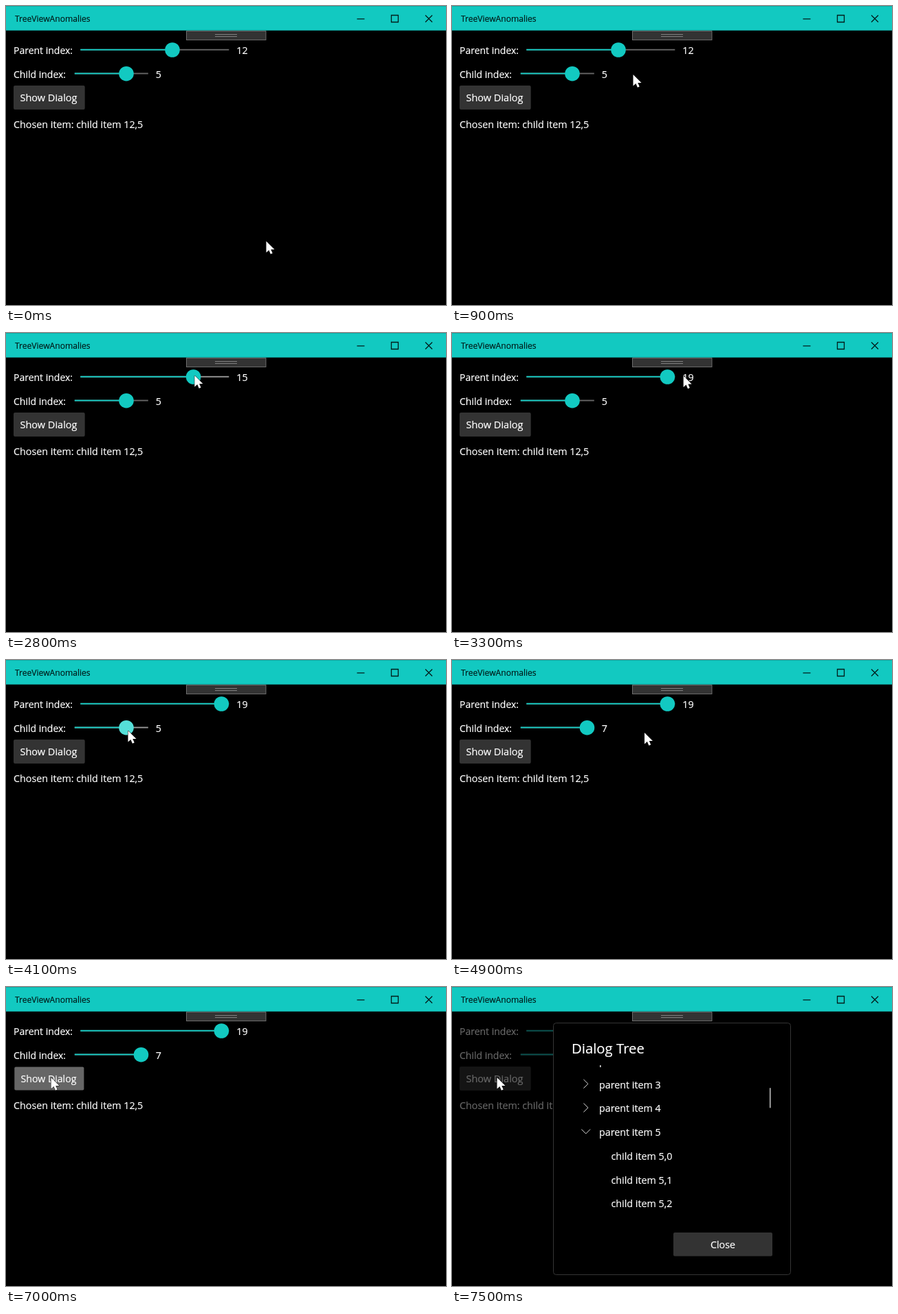
An HTML page that plays this animation: 640x436 px, repeating every 8000 ms.

```html
<!DOCTYPE html>
<html lang="en">
<head>
<meta charset="utf-8">
<title>TreeViewAnomalies</title>
<style>
  html, body { margin: 0; width: 100%; height: 100%; overflow: hidden; background: #000; }
  svg { display: block; width: 640px; height: 436px; color: #fff; }
  text {
    font: 14.3px "Open Sans", "Noto Sans", sans-serif; white-space: pre;
    fill: currentColor; stroke: currentColor; stroke-width: .2px;
  }
  .line { fill: none; stroke: currentColor; }
  .teal { fill: #12c9c1; }
  .caption { color: #021d1b; }
  .caption text { font-size: 12.1px; }
</style>
</head>
<body>
<svg viewBox="0 0 640 436">
  <clipPath id="listArea"><rect x="160" y="114" width="320" height="220"/></clipPath>
  <rect width="640" height="436"/>

  <g id="sliders"></g>
  <g id="button">
    <rect x="11" y="116" width="103.7" height="35" rx="2"/>
    <text x="20.5" y="139" style="font-size:14.5px">Show Dialog</text>
  </g>
  <text x="11" y="178">Chosen item: child item 12,5</text>
  <rect id="smoke" y="36" width="640" height="400"/>

  <g id="dialog">
    <rect x="147.5" y="52.5" width="345" height="367" rx="4" stroke="#353535"/>
    <text x="174" y="96.7" style="font-size:20.3px">Dialog Tree</text>
    <g id="list" clip-path="url(#listArea)"></g>
    <rect x="461.8" y="147" width="2" height="29.5" rx="1" fill="#9c9c9c"/>
    <rect x="322" y="358" width="144" height="34.5" rx="2" fill="#333"/>
    <text x="394" y="381" text-anchor="middle">Close</text>
  </g>

  <g class="caption">
    <rect class="teal" width="640" height="35.7"/>
    <rect width="640" height="1" fill="#0fa9a3"/>
    <text x="13" y="22.7">TreeViewAnomalies</text>
    <path class="line" stroke-width="1.3" d="M510.5 18.8h11M560.5 13.5h10v10h-10zM610 13.5l10 10m0 -10l-10 10"/>
  </g>
  <rect x="262.5" y="36.5" width="115.5" height="13" fill="#333" stroke="#6c6c6c"/>
  <path class="line" d="M304 41.5h32m0 3h-32" style="stroke:#808080"/>

  <path id="cursor" d="M.5 0V16.6L4.4 13L6.9 18.8L9.7 17.6L7.3 12H12.5Z" fill="#fff" stroke="#000" paint-order="stroke"/>
</svg>
<script>
const LOOP = 8000, STEP = 100;
const $ = selector => document.querySelector(selector);

const home = { x: 378, y: 343 };
const moves = [
  { from: 0, to: 200, x: 342, y: 239 },
  { from: 300, to: 900, x: 263, y: 100 },
  { from: 1500, to: 2200, x: 244, y: 62 },
  { from: 2600, to: 3100, x: 338, y: 62 },
  { from: 3200, to: 4100, x: 177, y: 103 },
  { from: 4100, to: 4800, x: 283, y: 115 },
  { from: 4800, to: 5000, x: 276, y: 97 },
  { from: 5000, to: 5300, x: 168, y: 225 },
  { from: 5300, to: 5600, x: 74, y: 147 },
  { from: 5600, to: 5900, x: 65, y: 132 }
];

const sliders = [
  { label: 'Parent index:', left: 108.3, y: 64, width: 216, first: 12, last: 19,
    thumb: 242, gap: 10.2, dragFrom: 2700, dragTo: 3200 },
  { label: 'Child index:', left: 99.8, y: 98.7, width: 107, first: 5, last: 7,
    thumb: 175, gap: 10.75, dragFrom: 4200, dragTo: 4600 }
];

const clamp = (v, lo, hi) => Math.min(hi, Math.max(lo, v));
const ramp = (t, from, to) => clamp((t - from) / (to - from), 0, 1);
const easeOut = p => 1 - (1 - p) ** 2;
const easeInOut = p => p ** 3 * (p * (6 * p - 15) + 10);
const inside = (p, x, y, w, h) => p.x >= x && p.x < x + w && p.y >= y && p.y < y + h;

function pointerAt(t) {
  return moves.reduce((p, m) => {
    const k = easeInOut(ramp(t, m.from, m.to));
    return { x: p.x + (m.x - p.x) * k, y: p.y + (m.y - p.y) * k };
  }, home);
}

function buildSliders() {
  $('#sliders').innerHTML = sliders.map(({ label, left, y, width }) => `<g>
    <text x="11" y="${y + 6.2}" style="font-size:14px">${label}</text>
    <rect class="track" x="${left}" y="${y - 1.2}" width="${width}" height="1.9"/>
    <rect class="fill teal" x="${left}" y="${y - 1.2}" height="1.9"/>
    <circle class="thumb" cy="${y}" r="10.8"/>
    <text class="value" x="${left + width + 11}" y="${y + 6.2}"/>
  </g>`).join('');
  sliders.forEach((s, i) => s.node = $('#sliders').children[i]);
}

function buildList() {
  const row = (i, x, label) => `<text x="${x}" y="${112.9 + i * 34.75}">${label}</text>`;
  const chevron = i => {
    const angle = i === 3 ? 90 : 0;
    return `<path class="line" d="M-3.3 -6.4L3.2 0L-3.3 6.4" style="stroke:#ddd"
      transform="translate(194.7 ${106.5 + i * 34.75}) rotate(${angle})"/>`;
  };
  let rows = '';
  for (let i = 0; i < 4; i++) rows += row(i, 214, `parent item ${i + 2}`) + chevron(i);
  for (let i = 0; i < 3; i++) rows += row(i + 4, 231.5, `child item 5,${i}`);
  $('#list').innerHTML = rows;
}

function drawSlider(s, t, pointer) {
  const dragging = t >= s.dragFrom && t < s.dragTo;
  const hover = inside(pointer, s.left, s.y - 16, s.width, 34);
  let value = t < s.dragFrom ? s.first : s.last;
  if (dragging) value = clamp(Math.round(s.first + (pointer.x - s.thumb) / s.gap), s.first, s.last);
  const x = s.thumb + (value - s.first) * s.gap;
  const part = name => s.node.querySelector('.' + name);
  part('track').setAttribute('fill', hover || dragging ? '#999' : '#666');
  part('fill').setAttribute('width', x - s.left);
  part('thumb').setAttribute('cx', x);
  part('thumb').setAttribute('fill', hover && !dragging ? '#55dfd8' : '#12c9c1');
  part('value').textContent = value;
}

function drawButton(t, pointer) {
  const open = t >= 7100;
  const press = open ? 0 : ramp(t, 6100, 6500);
  const hover = !open && inside(pointer, 11, 116, 104, 35);
  const gray = hover ? 26 + 76 * press : 51;
  $('#button rect').setAttribute('fill', `rgb(${gray},${gray},${gray})`);
  $('#button').setAttribute('transform',
    `translate(62.8 133.5) scale(${1 - 0.025 * press}) translate(-62.8 -133.5)`);
}

function draw(time) {
  const t = Math.floor(time % LOOP / STEP) * STEP;
  const pointer = pointerAt(t);
  sliders.forEach(s => drawSlider(s, t, pointer));
  drawButton(t, pointer);
  const shown = easeOut(ramp(t, 7000, 7500));
  $('#smoke').setAttribute('opacity', 0.6 * shown);
  $('#dialog').setAttribute('opacity', shown);
  $('#cursor').setAttribute('transform', `translate(${pointer.x} ${pointer.y})`);
}

buildSliders();
buildList();
const start = performance.now();
function tick() {
  draw(performance.now() - start);
  requestAnimationFrame(tick);
}
tick();
</script>
</body>
</html>
```
